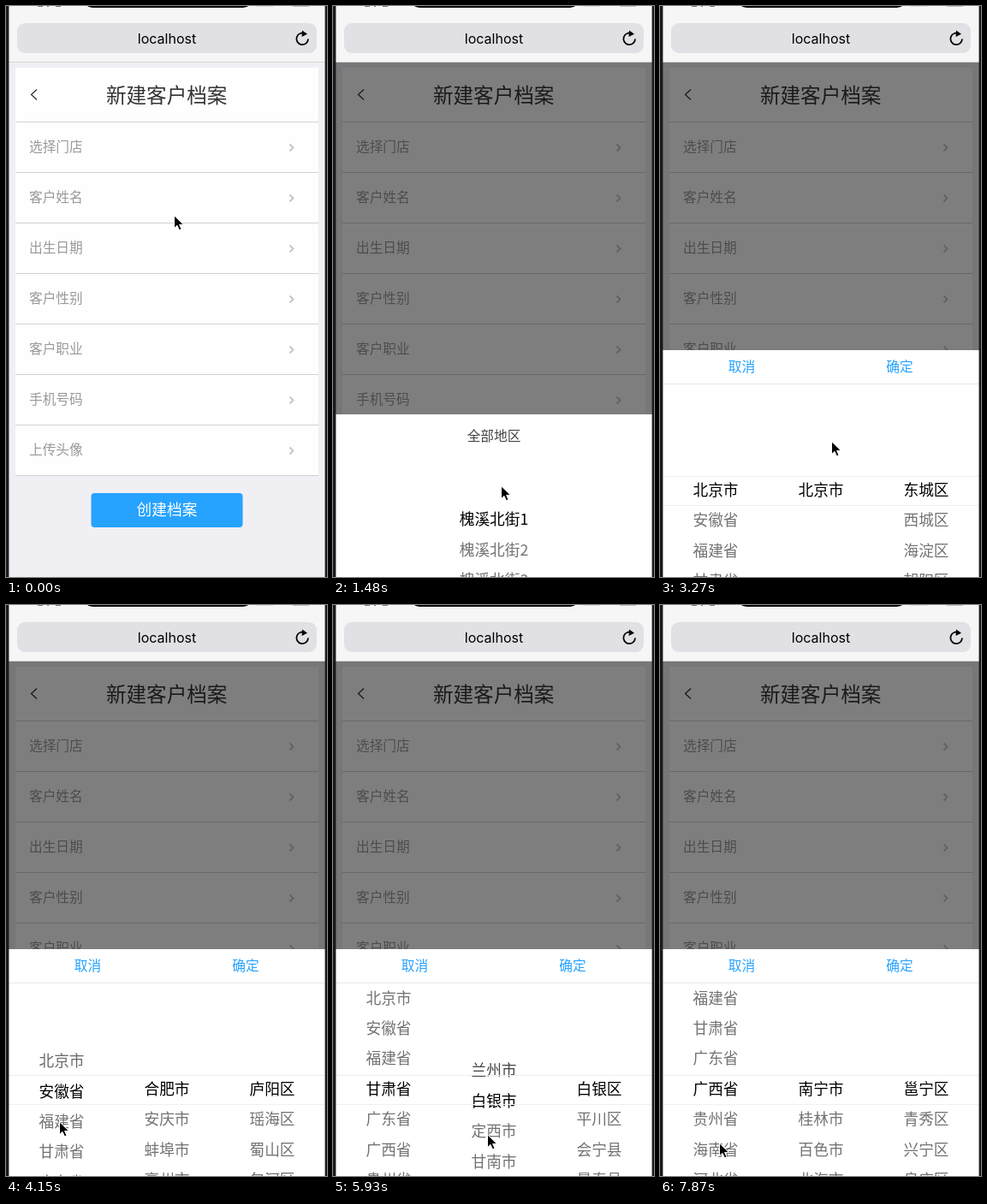
Animation, 375 px wide and 667 px high, one loop 8 s. Source, as an HTML page:

```html
<!DOCTYPE html>
<html lang="zh-CN">
<head>
<meta charset="utf-8">
<title>新建客户档案</title>
<style>
  html, body { margin: 0; width: 100%; height: 100%; overflow: hidden; background: #efeff4; }
  svg { display: block; width: 375px; height: 667px; }
  text { font-family: "Noto Sans CJK SC", "Noto Sans CJK", sans-serif; white-space: pre; }
  .url { font-family: Inter, sans-serif; }
</style>
</head>
<body>
<svg id="stage" viewBox="0 0 375 667"></svg>
<script>
const LOOP = 8000, STEP = 148.3;   // the screen refreshes about 6.7 times a second
const PITCH = 35.4, CENTER = 565;
const BLUE = '#26a2ff';
const stage = document.getElementById('stage');

const PROVINCES = '北京市 安徽省 福建省 甘肃省 广东省 广西省 贵州省 海南省 河北省'.split(' ');
const CITIES = {
  北京市: '北京市',
  安徽省: '合肥市 安庆市 蚌埠市 亳州市',
  福建省: '福州市 龙岩市 南平市 宁德市',
  甘肃省: '兰州市 白银市 定西市 甘南市 嘉峪关市 金昌市 酒泉市',
  广西省: '南宁市 桂林市 百色市 北海市'
};
const DISTRICTS = {
  北京市: '东城区 西城区 海淀区 朝阳区',
  合肥市: '庐阳区 瑶海区 蜀山区 包河区',
  福州市: '鼓楼区 台江区 仓山区 马尾区',
  兰州市: '城关区 七里河区 西固区 安宁区',
  白银市: '白银区 平川区 会宁县 景泰县',
  定西市: '安定区 通渭县 陇西县 渭源县',
  甘南市: '合作市 临潭县 卓尼县 舟曲县',
  南宁市: '邕宁区 青秀区 兴宁区 良庆区'
};

// Taps on the wheel: [tick, column, chosen index]
const PICKS = [[27, 0, 1], [32, 0, 2], [35, 0, 3], [40, 1, 1], [44, 1, 2], [47, 1, 3], [51, 0, 5]];

// Pointer stops: [tick, x, y]
const POINTER = [
  [0, 196, 244], [2, 210, 164], [6, 210, 164], [8, 222, 379], [9, 222, 379],
  [10, 196, 560], [11, 193, 579], [12, 193, 579], [13, 189, 565], [15, 200, 506],
  [21, 200, 506], [22, 200, 508], [25, 62, 603], [36, 62, 603], [38, 180, 618],
  [47, 180, 618], [49, 69, 628], [99, 69, 628]
];

const clamp = v => Math.min(1, Math.max(0, v));
const settle = (tick, start) => 1 - (1 - clamp((tick - start + 1) / 3)) ** 2.26;

const rect = (x, y, w, h, fill, extra = '') =>
  `<rect x="${x}" y="${y}" width="${w}" height="${h}" fill="${fill}" ${extra}/>`;
const line = (x, d, color, width) =>
  `<path d="M${x} ${d}" fill="none" stroke="${color}" stroke-width="${width}"/>`;
const label = (x, cy, str, size, fill, anchor = 'middle', cls = '') =>
  `<text x="${x}" y="${cy + size * 0.38}" font-size="${size}" fill="${fill}" text-anchor="${anchor}" class="${cls}">${str}</text>`;

function page() {
  const rows = ['选择门店', '客户姓名', '出生日期', '客户性别', '客户职业', '手机号码', '上传头像'];
  return rect(0, 65, 375, 602, '#efeff4') +
    rect(11, 72, 354, 477, '#fefefe') +
    line(36, '97.5l-6.5 6 6.5 6', '#333', 1.3) +
    label(187.7, 104.5, '新建客户档案', 23.6, '#333') +
    rect(11, 135, 354, 1, '#d2d2d2') +
    rows.map((name, i) => {
      const y = 165 + 59 * i;
      return label(27, y - 0.5, name, 15.7, '#999', 'start') +
        line(331.5, `${y - 3.5}l4 4-4 4`, '#c4c4c8', 1.8) +
        rect(11, y + 29, 354, 1, '#d2d2d2');
    }).join('') +
    rect(99.5, 569, 177, 40, BLUE, 'rx="4"') +
    label(188, 588.5, '创建档案', 17.7, '#fff');
}

function browser() {
  return rect(0, 0, 375, 65, '#f6f6f7') +
    rect(3, 65, 370, 1, '#d4d4d8') +
    rect(13, 20, 350, 35, '#e1e0e5', 'rx="9"') +
    label(188, 37.5, 'localhost', 16, '#000', 'middle', 'url') +
    '<path d="M349.5 32.4A6.8 6.8 0 1 0 353 38.5" fill="none" stroke="#000" stroke-width="1.8"/>' +
    '<path d="M346 28.6l6 4.2-6.4 3.2z"/>' +
    '<path d="M95 0H283Q280 2 274 2H104Q98 2 95 0"/>' +
    rect(37, 0, 6, 1, '#777') + rect(48, 0, 2, 1, '#777') + rect(58, 0, 6, 1, '#777') +
    rect(292, 0, 20, 1, '#ddd') + rect(335, 0, 19, 1, '#bbb') +
    rect(0, 0, 3.4, 667, '#1b191c') + rect(372.6, 0, 2.4, 667, '#1b191c');
}

function storeSheet(opacity) {
  return `<g opacity="${opacity}">` + rect(3, 477, 370, 190, '#fff') +
    label(188, 502.5, '全部地区', 15.7, '#444') +
    [1, 2, 3].map(i => label(188, 599.5 + PITCH * (i - 1), '槐溪北街' + i, 17.7, i > 1 ? '#707274' : '#000')).join('') +
    '</g>';
}

function wheel(x, items, chosen, from, p) {
  const pos = from + (chosen - from) * p;
  return items.map((name, i) => {
    const k = i === chosen ? 0 : i === from ? p : 1;
    const shade = Math.round(114 * k);
    return label(x, CENTER + (i - pos) * PITCH, name, 17.7, `rgb(${shade},${shade},${shade})`);
  }).join('');
}

function areaPicker(tick) {
  const chosen = [0, 0, 0], from = [0, 0, 0], p = [1, 1, 1];
  for (const [start, col, index] of PICKS) {
    if (start > tick) break;
    from[col] = chosen[col];
    chosen[col] = index;
    p[col] = settle(tick, start);
    if (col === 0) chosen[1] = from[1] = 0;
  }
  const cities = CITIES[PROVINCES[chosen[0]]].split(' ');
  const lists = [PROVINCES, cities, DISTRICTS[cities[chosen[1]]].split(' ')];
  const drop = 265 * (1 - settle(tick, 17));
  return `<g transform="translate(0 ${drop})">` + rect(3, 402, 370, 265, '#fff') +
    '<clipPath id="wheels"><path d="M0 442h375v225H0z"/></clipPath><g clip-path="url(#wheels)">' +
    lists.map((items, c) => wheel(65 + 123 * c, items, chosen[c], from[c], p[c])).join('') + '</g>' +
    label(95.5, 421, '取消', 15.7, BLUE) + label(280, 421, '确定', 15.7, BLUE) +
    rect(3, 441, 370, 1, '#e8e8e8') + rect(3, 549, 370, 1, '#ececec') + rect(3, 583, 370, 1, '#f0f0f0') +
    '</g>';
}

function pointer(tick) {
  const i = POINTER.findIndex(stop => stop[0] > tick);
  const [t0, x0, y0] = POINTER[i - 1], [t1, x1, y1] = POINTER[i];
  const k = (tick - t0) / (t1 - t0);
  return `<g transform="translate(${x0 + (x1 - x0) * k} ${y0 + (y1 - y0) * k})">` +
    '<path d="M.5 .8V15.6L4 12.4 6.4 17.8 9 16.7 6.6 11.4H11.4Z" stroke="#fff" stroke-width="1"/></g>';
}

function draw(tick) {
  const fade = clamp((tick - 3) / 2);
  const mask = rect(3, 65, 370, 602, '#000', `opacity="${fade / 2}"`);
  const sheet = storeSheet(tick < 6 ? fade * 0.78 : 1);
  // While fading in, the sheet still lies beneath the mask
  stage.innerHTML = page() + (tick < 6 ? sheet + mask : mask + sheet) +
    (tick > 16 ? areaPicker(tick) : '') + browser() + pointer(tick);
}

let shown = -1;
function run() {
  const tick = Math.floor((performance.now() % LOOP + 12) / STEP);
  if (tick !== shown) draw(shown = tick);
  requestAnimationFrame(run);
}
run();
</script>
</body>
</html>
```
